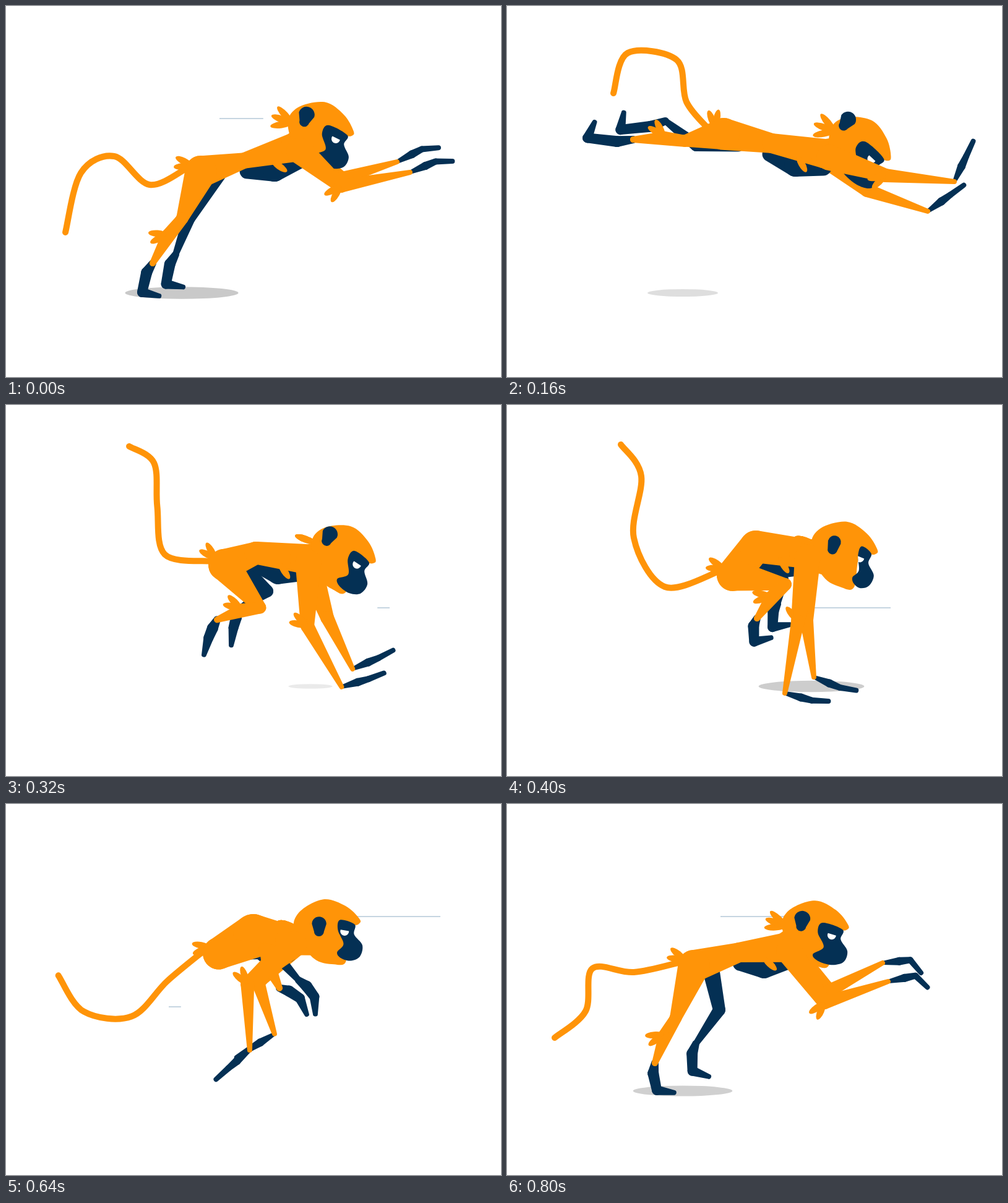
Recreate the animation shown at these times as an HTML page with a canvas. Size 800 px wide and 600 px high, loop 840 ms.

```html
<!DOCTYPE html>
<html lang="en">
<head>
<meta charset="utf-8">
<title>Running monkey</title>
<style>
html, body { margin: 0; height: 100%; overflow: hidden; background: #fff; }
canvas { display: block; }
</style>
</head>
<body>
<canvas id="stage" width="800" height="600"></canvas>
<script>
const ctx = document.getElementById('stage').getContext('2d');
const ORANGE = '#ff9408', NAVY = '#043054';
const STEP = 40, STEPS = 21;
const KEYS = [0, 4, 6, 10, 14, 18, 20]; // pose times, in steps
const RAD = Math.PI / 180;

// Hip, waist with its radius, chest
const spine = [
  [315,268, 385,250,13, 468,228], [350,207, 428,222,16, 515,239], [343,232, 412,244,12, 490,254],
  [365,275, 402,229,26, 480,240], [378,240, 425,210,37, 484,225], [305,250, 370,217,24, 435,220],
  [302,262, 375,240,16, 450,232]];
// Centre, tilt in degrees, turn away from the viewer
const head = [
  [503,207, 13,-0.3], [563,231, 30,-0.8], [541,245, 30,-0.8], [540,241, 10,1],
  [541,213, -5,1], [490,205, 0,0], [494,209, 4,-0.25]];
// Middle joint, end joint, direction of the foot or hand in degrees
const nearLeg = [
  [285,343, 237,416, 110], [288,218, 204,216, 182], [326,317, 253,302, 136], [450,290, 404,345, 97],
  [440,212, 466,282, 43], [376,296, 384,358, 26], [273,345, 239,419, 86]];
const farLeg = [
  [296,343, 274,402, 108], [306,225, 256,186, 169], [376,310, 310,291, 116], [445,282, 437,322, 102],
  [450,225, 485,280, 52], [400,288, 430,332, 54], [343,333, 305,388, 97]];
const nearArm = [
  [541,291, 653,269, -23], [612,274, 723,284, -65], [520,355, 622,390, -38], [470,350, 449,466, 15],
  [430,308, 359,398, 144], [370,299, 455,352, 99], [513,321, 616,287, -12]];
const farArm = [
  [543,279, 632,252, -27], [582,298, 680,332, -36], [548,326, 618,388, -54], [484,348, 496,440, 22],
  [436,308, 419,395, 134], [397,290, 475,333, 127], [521,302, 607,257, -6]];
// Toe bend and foot length; finger bend
const foot = [[-98,50], [112,74], [120,33], [-110,38], [68,33], [-22,42], [-78,44]];
const fingers = [[22], [0], [0], [-12], [-35], [40], [56]];
const tail = [
  [232,289, 175,243, 121,270, 96,366], [290,155, 274,87, 195,76, 172,141],
  [272,196, 278,135, 254,100, 214,102], [255,294, 205,215, 217,115, 184,64],
  [325,312, 245,315, 165,285, 134,233], [207,248, 179,325, 110,340, 45,292],
  [205,272, 138,266, 127,335, 77,378]];

// Head outlines around its centre
const skull = [-50,-5, -40,-35, 0,-53, 35,-40, 56,-18, 54,-9, 30,0, 30,49, 10,53, -22,41];
const face = [18,-18, 48,-9, 46,7, 58,25, 53,43, 35,49, 15,44, 7,34, 22,21, 12,-2];

const clamp = v => Math.max(0, Math.min(1, v));
const mix = (a, b, u) => a + (b - a) * u;
const move = (x, y, len, deg) => [x + len * Math.cos(deg * RAD), y + len * Math.sin(deg * RAD)];
const heading = (x1, y1, x2, y2) => Math.atan2(y2 - y1, x2 - x1) / RAD;

// Smooth cyclic interpolation between the poses
function sample(poses, step, isAngle = () => false) {
  const n = KEYS.length;
  let i = n - 1;
  while (KEYS[i] > step) i--;
  const around = [i - 1, i, i + 1, i + 2];
  const [t0, t1, t2, t3] = around.map(k => KEYS[(k + n) % n] + STEPS * Math.floor(k / n));
  const [a, b, c, d] = around.map(k => poses[(k + n) % n]);
  const span = t2 - t1, u = (step - t1) / span;
  return b.map((p1, k) => {
    const near = (v, ref) => isAngle(k) ? v - 360 * Math.round((v - ref) / 360) : v;
    const p0 = near(a[k], p1), p2 = near(c[k], p1), p3 = near(d[k], p2);
    const m1 = (p2 - p0) / (t2 - t0) * span, m2 = (p3 - p1) / (t3 - t1) * span;
    const e = 3 * (p2 - p1) - 2 * m1 - m2, f = 2 * (p1 - p2) + m1 + m2;
    return p1 + u * (m1 + u * (e + u * f));
  });
}

// Chains turn about their joints, so each bone is kept as length and angle
function toBones(p) {
  const out = p.slice(0, 2);
  for (let i = 2; i < p.length; i += 2) {
    const [x1, y1, x2, y2] = p.slice(i - 2, i + 2);
    out.push(Math.hypot(x2 - x1, y2 - y1), heading(x1, y1, x2, y2));
  }
  return out;
}
function sampleChain(bones, step) {
  const p = sample(bones, step, k => k > 2 && k % 2 === 1);
  for (let i = 2; i < p.length; i += 2) {
    [p[i], p[i + 1]] = move(p[i - 2], p[i - 1], p[i], p[i + 1]);
  }
  return p;
}

// A place beside the spine: along it and towards the belly
function beside(x, y, deg, along, down) {
  return move(...move(x, y, along, deg), down, deg + 90);
}
const nearHip = s => [s[0], s[1]];
const farHip = s => beside(s[0], s[1], heading(...s), 25, 10);
const shoulder = s => [s[5] + 6, s[6] + 6];
const rump = s => [s[0] - 22, s[1] - 6];
const attach = (root, poses, joints) =>
  poses.map((p, i) => toBones([...root(spine[i]), ...p.slice(0, 2 * joints)]));

const tailBones = attach(rump, tail, 4);
const limbs = {
  nearLeg: { poses: nearLeg, bones: attach(nearHip, nearLeg, 2) },
  farLeg: { poses: farLeg, bones: attach(farHip, farLeg, 2) },
  nearArm: { poses: nearArm, bones: attach(shoulder, nearArm, 2) },
  farArm: { poses: farArm, bones: attach(shoulder, farArm, 2) }
};

function spline(p, closed) {
  const n = p.length / 2;
  const index = i => closed ? (i + n) % n : Math.max(0, Math.min(n - 1, i));
  const pt = i => [p[2 * index(i)], p[2 * index(i) + 1]];
  const handle = (i, sign) => {
    const [x, y] = pt(i), [ax, ay] = pt(i - 1), [bx, by] = pt(i + 1);
    return [x + sign * (bx - ax) / 6, y + sign * (by - ay) / 6];
  };
  ctx.beginPath();
  ctx.moveTo(...pt(0));
  for (let i = 0; i < (closed ? n : n - 1); i++) {
    ctx.bezierCurveTo(...handle(i, 1), ...handle(i + 1, -1), ...pt(i + 1));
  }
}
function blob(p, color) {
  spline(p, true);
  ctx.fillStyle = color;
  ctx.fill();
}

// Tapered bones between circles
function taper(p, radii, color) {
  ctx.fillStyle = color;
  for (let i = 0; i < radii.length - 1; i++) {
    const [x1, y1, x2, y2] = p.slice(2 * i, 2 * i + 4);
    const a = Math.atan2(y2 - y1, x2 - x1), q = Math.PI / 2;
    ctx.beginPath();
    ctx.arc(x1, y1, radii[i], a + q, a + 3 * q);
    ctx.arc(x2, y2, radii[i + 1], a - q, a + q);
    ctx.fill();
  }
}

function ellipse(x, y, rx, ry, angle, color) {
  ctx.fillStyle = color;
  ctx.beginPath();
  ctx.ellipse(x, y, rx, ry, angle, 0, 2 * Math.PI);
  ctx.fill();
}

function tuft(x, y, deg, leaves = 2, spread = 32, length = 30) {
  for (let i = 0; i < leaves; i++) {
    const a = deg + (i - (leaves - 1) / 2) * spread;
    ellipse(...move(x, y, length / 2, a), length / 2, 5.5, a * RAD, ORANGE);
  }
}

function leg({ poses, bones }, step, color, hipRadius) {
  const p = sampleChain(bones, step), [kx, ky, ax, ay] = p.slice(2);
  const [toe, length] = sample(foot, step), deg = sample(poses, step)[4];
  const side = Math.sign(toe) || 1;
  const heel = move(...move(ax, ay, length * 0.35, deg), 4, deg - side * 90 * clamp(Math.abs(toe) / 90));
  const ball = move(ax, ay, length, deg);
  taper([ax, ay, ...heel, ...ball, ...move(...ball, 28, deg + toe)], [6, 9, 8, 4], NAVY);
  taper(p, [hipRadius, 10, 5], color);
  if (color === NAVY) return;
  const shin = heading(kx, ky, ax, ay);
  const calf = move(mix(kx, ax, 0.38), mix(ky, ay, 0.38), 7, shin + 70);
  taper([kx, ky, ...calf, ax, ay], [9, 8, 5], color);
  tuft(...calf, shin + 45);
}

function arm({ poses, bones }, step) {
  const p = sampleChain(bones, step), [ex, ey, wx, wy] = p.slice(2);
  const deg = sample(poses, step)[4];
  const knuckle = move(wx, wy, 45, deg);
  const tip = move(...knuckle, 27, deg + sample(fingers, step)[0]);
  taper([wx, wy, ...move(wx, wy, 27, deg), ...knuckle, ...tip], [3, 6.5, 5, 4], NAVY);
  taper(p, [21, 11, 4], ORANGE);
  return [ex, ey, heading(ex, ey, wx, wy) + 147];
}

function drawTorso(step) {
  const [hx, hy, wx, wy, waist, cx, cy] = sample(spine, step);
  const deg = heading(wx, wy, cx, cy);
  const mid = [(wx + cx) / 2, (wy + cy) / 2];
  taper([...beside(wx, wy, deg, 0, 18), ...beside(...mid, deg, 0, 28), ...beside(cx, cy, deg, 0, 22)],
    [12, 18, 14], NAVY);
  taper([hx, hy, wx, wy, cx, cy], [26, waist, 24], ORANGE);
  tuft(...beside(...mid, deg, 0, 12), deg + 50, 1);
  return [cx, cy];
}

function drawHead(step, chest) {
  const [x, y, tilt, turn] = sample(head, step);
  taper([...chest, x - 12, y + 8], [24, 30], ORANGE);
  ctx.save();
  ctx.translate(x, y);
  ctx.rotate(tilt * RAD);
  const leaves = clamp(-3 * turn);
  tuft(-43, -8, 200 - tilt, 3, 31 * leaves, 36);
  blob(skull, ORANGE);
  blob(face.map((v, i) => i % 2 ? v : v + turn * Math.max(0, 46 - v) * 0.45), NAVY);
  ctx.save();
  ctx.clip();
  ctx.fillStyle = '#fff';
  ctx.beginPath();
  ctx.arc(31, 1, 7, 0, 3.6);
  ctx.fill();
  ctx.restore();
  // The ear slides over the skull as the head tilts and turns
  const shift = 8 * Math.max(0, turn);
  const ex = -16 - 0.6 * tilt + shift, ey = -20 - 0.5 * tilt + shift;
  taper([ex, ey, ex - 1, ey + 12], [13 - shift * 0.3, 8], NAVY);
  ctx.restore();
}

// Shadows swell while the feet or hands are near the ground
function shadow(x, y, peak, width, step) {
  const away = (step - peak + 1.5 * STEPS) % STEPS - STEPS / 2;
  const rx = 95 * Math.sqrt(clamp(1 - (away / width) ** 2));
  ellipse(x, y, rx, rx * 0.107, 0, `rgba(0,0,0,${rx * 0.0023})`);
}

// A line that grows to the left, then shrinks after its own end
function speedLine(right, y, start, step) {
  const since = (step - start + STEPS) % STEPS;
  const ease = s => { const u = clamp(s / 7); return u * u * (3 - 2 * u); };
  const from = right - 357 * ease(since), to = right - 357 * ease(since - 3);
  ctx.fillStyle = '#c6d5e1';
  ctx.fillRect(from, y - 1, to - from, 2);
}

function drawTail(step) {
  const p = sampleChain(tailBones, step);
  spline(p, false);
  ctx.strokeStyle = ORANGE;
  ctx.lineWidth = 10;
  ctx.lineCap = ctx.lineJoin = 'round';
  ctx.stroke();
  tuft(p[0] + 8, p[1] - 4, heading(...p) + 35);
}

function draw(step) {
  ctx.fillStyle = '#fff';
  ctx.fillRect(0, 0, 800, 600);
  speedLine(702, 182, 13, step);
  speedLine(620, 328, 7, step);
  shadow(284, 464, 1, 3.75, step);
  shadow(492, 455, 11.8, 4.1, step);
  arm(limbs.farArm, step);
  leg(limbs.farLeg, step, NAVY, 14);
  drawTail(step);
  drawHead(step, drawTorso(step));
  leg(limbs.nearLeg, step, ORANGE, 26);
  tuft(...arm(limbs.nearArm, step));
}

function tick() {
  draw(Math.floor(performance.now() / STEP) % STEPS);
  requestAnimationFrame(tick);
}
tick();
</script>
</body>
</html>
```
